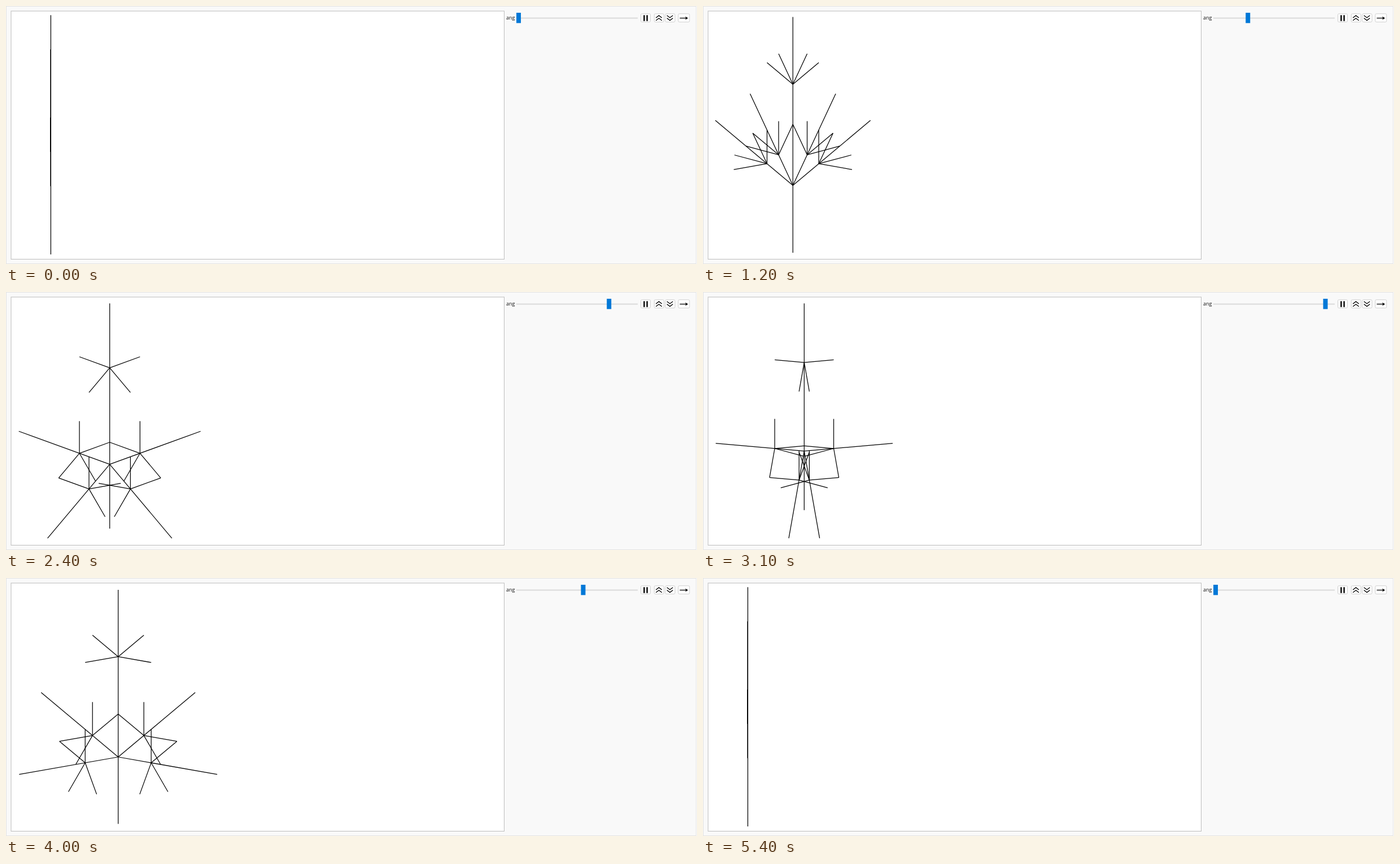
Write an HTML page that moves like this. It is 1224x458 px and loops after 6 s.

```html
<!DOCTYPE html>
<html lang="en">
<head>
<meta charset="utf-8">
<title>Branching angle</title>
<style>
  html, body { margin: 0; width: 100%; height: 100%; overflow: hidden; background: #fff; }
  svg { display: block; width: 1224px; height: 458px; }
  text { font: 9px "Open Sans", "Noto Sans", sans-serif; fill: #111; }
  #tree { stroke: #000; stroke-width: 1.25; }
  .button { fill: #fff; stroke: #cfcfcf; }
  .icon { fill: none; stroke: #000; stroke-width: 1.3; }
</style>
</head>
<body>
<svg viewBox="0 0 1224 458">
  <rect x=".5" y=".5" width="1222" height="457" fill="#f9f9f9" stroke="#e3e3e3"/>
  <rect x="9" y="9" width="873.5" height="440.5" fill="#fff" stroke="#bcbcbc"/>
  <g id="tree"></g>

  <text x="886" y="24">ang</text>
  <rect x="904" y="20.5" width="215" height="2" fill="#dadada"/>
  <rect id="knob" y="12" width="8" height="18.3" fill="#0078d7"/>

  <g class="button">
    <rect x="1124.5" y="13.8" width="17" height="14.6" rx="2"/>
    <rect x="1148.3" y="13.8" width="17" height="14.6" rx="2"/>
    <rect x="1168" y="13.8" width="17" height="14.6" rx="2"/>
    <rect x="1190.8" y="13.8" width="20" height="14.6" rx="2"/>
  </g>
  <path class="icon" style="stroke-width:2.4" d="M1130.4 16.3v10.4M1135.6 16.3v10.4"/>
  <path class="icon" d="M1151.2 20.9l5.3-4 5.3 4M1151.2 25.7l5.3-4 5.3 4"/>
  <path class="icon" d="M1170.7 16.8l5.3 4 5.3-4M1170.7 21.6l5.3 4 5.3-4"/>
  <path class="icon" d="M1193.5 21.5h12"/>
  <path d="M1203.2 18.4l5 3.1-5 3.1 1.2-3.1z"/>
</svg>
<script>
const LOOP = 6000, STEP = 5;
// Times of each step up; the way down mirrors them.
const STEPS = [6, 7, 9, 10, 12, 13, 14, 16, 17, 18, 20, 21, 22, 24, 25, 27, 28, 29].map(s => s * 100);
const TURNS = [1, -1, 2, -2];
const tree = document.getElementById('tree');
const knob = document.getElementById('knob');

function setAttrs(el, attrs) {
  for (const name in attrs) el.setAttribute(name, attrs[name]);
}

function angleAt(t) {
  const up = STEPS.filter(s => s <= t).length;
  const down = STEPS.filter(s => LOOP - s <= t).length;
  return (up - down) * STEP;
}

// X -> F[+X][-X][++X][--X]FX, F -> FF, expanded twice; y points up.
function grow(angle) {
  const lines = [];
  function branch(x, y, heading, depth) {
    const dx = Math.sin(heading), dy = Math.cos(heading);
    const at = d => [x + d * dx, y + d * dy];
    const length = 2 ** (depth + 1) - 1;
    lines.push([[x, y], at(length)]);
    for (let level = depth, d = 0; level > 0; level--) {
      const f = 2 ** (level - 1);
      d += f;
      for (const turn of TURNS) branch(...at(d), heading + turn * angle, level - 1);
      d += f;
    }
  }
  branch(0, 0, 0, 2);
  return lines;
}

// Fit to the pane height, padding both axes by 2% of the width.
function fit(lines) {
  const xs = lines.flat().map(p => p[0]), ys = lines.flat().map(p => p[1]);
  let left = Math.min(...xs), right = Math.max(...xs);
  if (right - left < 1e-6) { left -= 1; right += 1; }
  const top = Math.max(...ys), width = right - left;
  const unit = 429.6 / (top - Math.min(...ys) + 0.04 * width);
  const pad = 0.02 * width * unit;
  return ([x, y]) => [16.3 + pad + (x - left) * unit, 13.9 + pad + (top - y) * unit];
}

function draw(angle) {
  const lines = grow(angle * Math.PI / 180);
  const place = fit(lines);
  lines.forEach((line, i) => {
    const el = tree.children[i] ||
      tree.appendChild(document.createElementNS('http://www.w3.org/2000/svg', 'line'));
    const [[x1, y1], [x2, y2]] = line.map(place);
    setAttrs(el, { x1, y1, x2, y2 });
  });
  setAttrs(knob, { x: 904.05 + 2.288 * angle });
}

let shown;
function tick() {
  const angle = angleAt(performance.now() % LOOP);
  if (angle !== shown) draw(shown = angle);
  requestAnimationFrame(tick);
}
tick();
</script>
</body>
</html>
```
